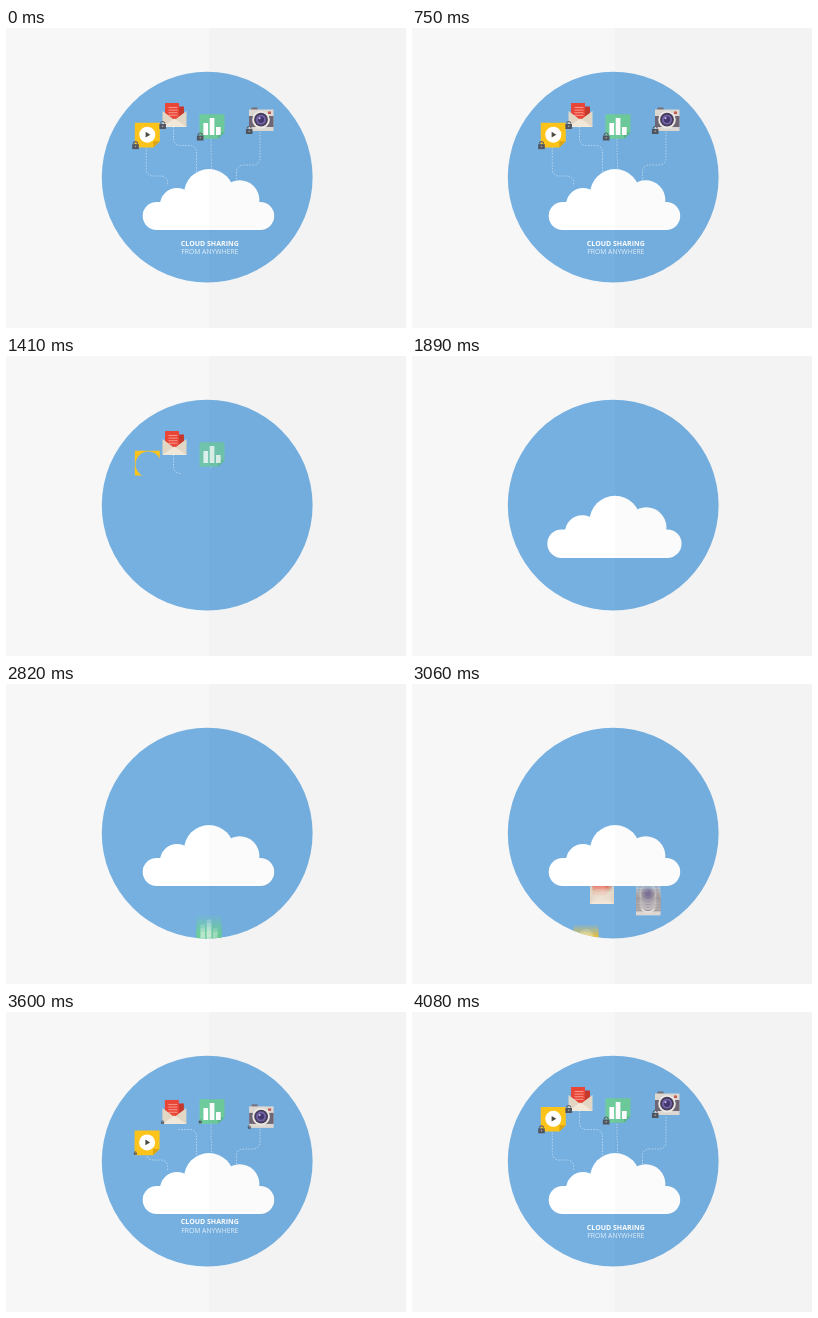
Write an HTML page with a canvas that moves like this. It is 400x300 px and loops after 4110 ms.

```html
<!DOCTYPE html>
<html lang="en">
<head>
<meta charset="utf-8">
<title>Cloud sharing</title>
<style>
  html, body { margin: 0; width: 100%; height: 100%; overflow: hidden; background: #f7f7f7; }
  canvas { display: block; width: 100vw; height: 100vh; }
</style>
</head>
<body>
<canvas id="stage"></canvas>
<script>
const LOOP = 4110, W = 400, H = 300, FLOOR = 272, MID = 203;
const dpr = window.devicePixelRatio || 1;
const stage = document.getElementById('stage');
const layer = document.createElement('canvas');
for (const c of [stage, layer]) { c.width = W * dpr; c.height = H * dpr; }
const main = stage.getContext('2d'), off = layer.getContext('2d');
main.scale(dpr, dpr);
off.scale(dpr, dpr);
let g = main;

// Timing helpers
const prog = (t, start, span) => Math.min(1, Math.max(0, (t - start) / span));
const mix = (a, b, p) => a + (b - a) * p;
const outCubic = p => 1 - (1 - p) ** 3;
const outBack = p => 1 + 2 * (p - 1) ** 3 + (p - 1) ** 2;

// Shape helpers
const rect = (x, y, w, h, fill) => { g.fillStyle = fill; g.fillRect(x, y, w, h); };
function disc(x, y, r, fill) {
  if (r <= 0) return;
  g.fillStyle = fill;
  g.beginPath();
  g.arc(x, y, r, 0, 7);
  g.fill();
}
function poly(fill, ...pts) {
  g.fillStyle = fill;
  g.beginPath();
  for (let i = 0; i < pts.length; i += 2) g.lineTo(pts[i], pts[i + 1]);
  g.fill();
}
function onLayer(draw) {
  off.clearRect(0, 0, W, H);
  g = off;
  g.save();
  draw();
  g.restore();
  g = main;
  g.drawImage(layer, 0, 0, W, H);
}
function punch(x, y, r) {
  g.globalCompositeOperation = 'destination-out';
  disc(x, y, r, '#000');
  g.globalCompositeOperation = 'source-over';
}

// Icons, drawn around their centres
function sheet(fill, fold) {
  rect(-12.5, -12.5, 25, 25, fill);
  g.clearRect;
  poly(fold, 12.5, 6, 6, 6, 6, 12.5, 12.5, 12.5);
}
function note(fill, fold) {
  poly(fill, -12.5, -12.3, 12.5, -12.3, 12.5, 6, 6, 12.3, -12.5, 12.3);
  poly(fold, 12.5, 6, 6, 6, 6, 12.3);
}
function video() {
  note('#fcc41b', '#dba416');
  disc(0, -.5, 8, '#fff');
  poly('#4d4a40', -1.7, -3.3, 3, -.5, -1.7, 2.3);
}
function mail() {
  rect(3, -8.5, 6.5, 10, '#c5382e');
  rect(-9.5, -12, 14, 18, '#ea4637');
  for (let y = -8; y < 1; y += 2.6) rect(-6, y, 9, 1, '#f7968c');
  poly('#e2d6c4', -12, -4, 0, 5, 12, -4, 12, 12, -12, 12);
  poly('#f1e8da', -12, 12, 0, 3.5, 12, 12);
}
function chart() {
  note('#6ecb9b', '#58b586');
  [12, 17, 8].forEach((h, i) => rect(6.3 * i - 8.6, 8.5 - h, 4.7, h, '#fff'));
}
function camera() {
  rect(-9.5, -12.5, 6, 3, '#77717a');
  rect(-12, -10.5, 24.5, 21.5, '#e0dad4');
  rect(-12, -4, 24.5, 11, '#716877');
  rect(7, -8.5, 3, 2.5, '#c75a52');
  ['#f0ece8', '#453d5a', '#7363a8', '#43376f'].forEach((c, i) => disc(0, -.3, 8.8 - 1.9 * i, c));
  disc(-1.5, -1.8, 1.1, '#c4bae6');
}
function lock(x, y, s) {
  if (s <= 0) return;
  g.save();
  g.translate(x, y);
  g.scale(s, s);
  g.strokeStyle = '#5b606a';
  g.lineWidth = 1.2;
  g.beginPath();
  g.arc(0, -1.5, 2, Math.PI, 0);
  g.stroke();
  rect(-3.3, -1, 6.6, 5, '#50555f');
  disc(0, 1.3, .8, '#a5a9b0');
  g.restore();
}

// In order of leaving. from: x under the cloud, rise: start and span,
// bend and end: where the dotted line turns and drops
const icons = [
  { draw: camera, x: 255, y: 92, from: 236, rise: [2921, 1163], grow: 3400, bend: 137, end: 230.5 },
  { draw: video, x: 141.3, y: 107, from: 174, rise: [3031, 1200], grow: 3500, bend: 148, end: 161.7 },
  { draw: chart, x: 206, y: 98.5, from: 203, rise: [2780, 1000], grow: 3350, bend: 130, end: 205.5 },
  { draw: mail, x: 168.5, y: 87, from: 190, rise: [2884, 1220], grow: 3450, bend: 117.5, end: 190.5 }
];

function drawLine(icon, i, t) {
  const back = t > 2000;
  const part = back ? prog(t, icon.grow, 220) : 1 - prog(t, 840 + 100 * i, 380);
  if (part <= 0) return;
  const x = icon.x - 1, { bend, end } = icon;
  const pts = [[x, icon.y + 12], [x, bend], [end, bend], [end, 158]];
  if (back) pts.reverse();
  const [a, b, c, d] = pts;
  const r = Math.min(6.5, Math.abs(end - x) / 2);
  g.beginPath();
  g.moveTo(...a);
  g.arcTo(...b, ...c, r);
  g.arcTo(...c, ...d, r);
  g.lineTo(...d);
  const len = (158 - icon.y - 12 + Math.abs(end - x)) * part;
  const dash = [];
  for (let s = 0; s < len; s += 3) dash.push(1.5, 1.5);
  g.setLineDash([...dash, 0, 999]);
  g.strokeStyle = 'rgba(255,255,255,.52)';
  g.lineWidth = .9;
  g.stroke();
  g.setLineDash([]);
}

function place(icon, t) {
  g.translate(
    mix(icon.from, icon.x, outBack(prog(t, 3300, 330))),
    mix(FLOOR, icon.y, outCubic(prog(t, ...icon.rise))));
}
function drawIcon(icon, i, t) {
  const back = t > 2000, out = back ? 0 : prog(t, 1225 + 72 * i, 170);
  if (out === 1 || back && t < icon.rise[0] - 30) return;
  if (back && t < 3340) {
    // Average a few moments to smear the fast rise
    for (let k = 0; k < 5; k++) {
      g.save();
      g.globalAlpha = 1 / (k + 1);
      place(icon, t + (k - 2) * 8);
      icon.draw();
      g.restore();
    }
    return;
  }
  const size = back ? outBack(prog(t, 3560, 300)) : 1 - prog(t, 1060, 190);
  const paint = () => {
    place(icon, back ? t : LOOP);
    icon.draw();
    lock(-11.8, 10, size);
  };
  g.save();
  if (!out) paint();
  else if (icon.draw === chart) {
    g.globalAlpha = 1 - out;
    paint();
  } else onLayer(() => {
    paint();
    punch(1, 1, 19 * out);
  });
  g.restore();
}

// dx, dy: drift while collapsing
const bumps = [
  { x: 171, y: 177, r: 17, dx: 20, dy: -1 },
  { x: 233.7, y: 172, r: 19.7, dx: -7, dy: 2 },
  { x: MID, y: 166, r: 25, dx: 1, dy: 28 }
];
function pill(inset) {
  g.fillStyle = '#fff';
  g.beginPath();
  g.roundRect(136.7 + inset, 174 + inset, 131.5 - 2 * inset, 28 - 2 * inset, 14 - inset);
  g.fill();
}
function ring(b, q, shrink, hole) {
  const x = b.x + b.dx * q, y = b.y + b.dy * q;
  disc(x, y, b.r * (1 - shrink * q), '#fff');
  punch(x, y, b.r * hole * q);
}
function drawCloud(t) {
  const q = prog(t, 750, 480);
  if (t < 1300) {
    if (q === 1) return;
    const [left, right, top] = bumps;
    onLayer(() => ring(left, q, .33, .93));
    onLayer(() => ring(right, q, .3, .9));
    onLayer(() => {
      pill(1.5 * q);
      punch(MID, 188, 68 * q * q);
    });
    g.globalAlpha = 1 - .5 * q;
    onLayer(() => ring(top, q, .8, .4));
    g.globalAlpha = 1;
    return;
  }
  if (t < 1620) return;
  const s = outBack(prog(t, 1620, 330));
  g.save();
  g.translate(MID, 202);
  g.scale(s, s);
  g.translate(-MID, -202);
  pill(0);
  bumps.forEach(b => disc(b.x, b.y, b.r, '#fff'));
  g.restore();
}

function caption(text, font, y, alpha) {
  if (alpha <= 0) return;
  g.font = font + ' "Open Sans", sans-serif';
  g.textAlign = 'center';
  g.fillStyle = `rgba(255,255,255,${alpha})`;
  g.fillText(text, 203.8, y);
}
function drawText(t) {
  const back = t > 2000;
  if (back && t < 3380) return;
  const a = back ? 1 - outCubic(prog(t, 3400, 560)) : prog(t, 750, 285) ** 2;
  const b = back ? 1 - outCubic(prog(t, 3370, 520)) : prog(t, 850, 270) ** 2;
  caption('CLOUD SHARING', '700 7px', 218 - 24 * a, back ? 1 : 1 - a * a);
  caption('FROM ANYWHERE', '400 6.8px', 225.6 - 26 * b, back ? .8 : .8 * (1 - b));
}

function render(t) {
  rect(0, 0, W, H, '#f7f7f7');
  disc(201.2, 149.2, 105.4, '#75b0e1');
  g.save();
  g.beginPath();
  g.arc(201.2, 149.2, 105.4, 0, 7);
  g.clip();
  icons.forEach((icon, i) => drawLine(icon, i, t));
  icons.forEach((icon, i) => drawIcon(icon, i, t));
  drawText(t);
  drawCloud(t);
  g.restore();
  rect(MID, 0, W - MID, H, 'rgba(0,0,0,.017)');
}

function tick() {
  render(performance.now() % LOOP);
  requestAnimationFrame(tick);
}
tick();
</script>
</body>
</html>
```
